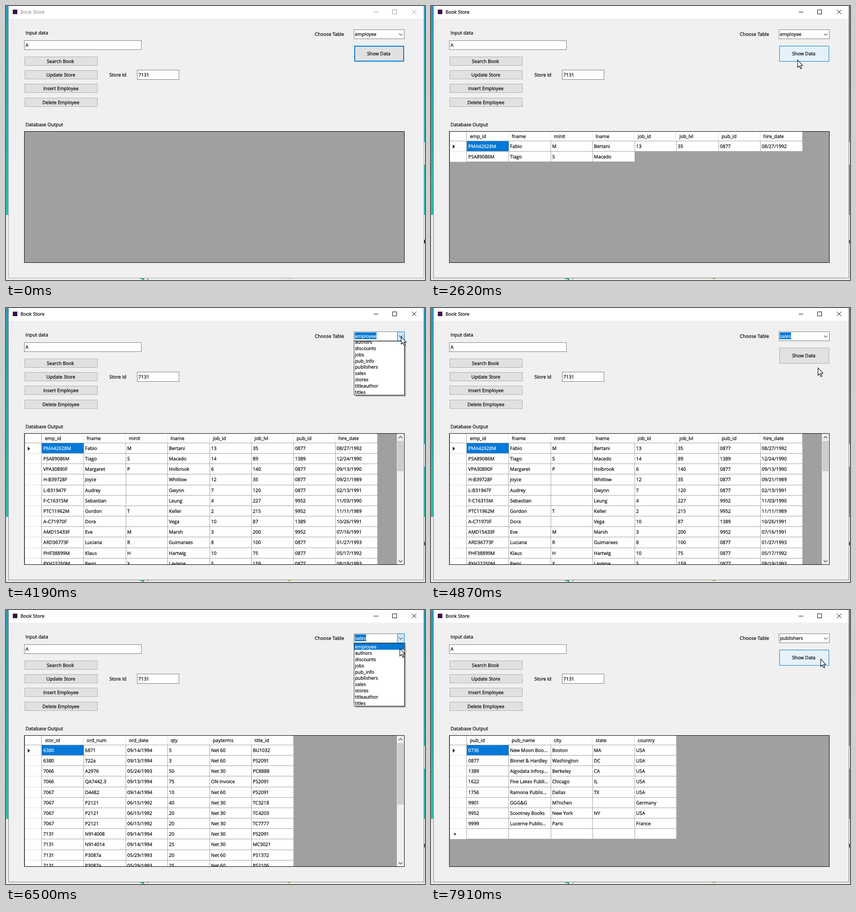
These frames come from a looping animation (924 by 606 pixels, 7990 ms). An HTML page with a canvas:

```html
<!DOCTYPE html>
<html lang="en">
<head>
<meta charset="utf-8">
<title>Book Store</title>
<style>
  html, body { margin: 0; width: 100%; height: 100%; overflow: hidden; background: #f0f0f0; }
  canvas { display: block; }
</style>
</head>
<body>
<canvas id="stage" width="924" height="606"></canvas>
<script>
const ctx = document.getElementById('stage').getContext('2d', { alpha: false });
const LOOP = 7990, START = 210, TICK = 77.78;
const BLUE = '#0078d7', GRID = '#a0a0a0';

const parseTable = (head, body) => ({
  head: head.split(','),
  rows: body.trim().split('\n').map(row => row.trim().split(',')),
});

const employee = {
  ...parseTable('emp_id,fname,minit,lname,job_id,job_lvl,pub_id,hire_date', `
    PMA42628M,Fabio,M,Bertani,13,35,0877,08/27/1992
    PSA89086M,Tiago,S,Macedo,14,89,1389,12/24/1990
    VPA30890F,Margaret,P,Holbrook,6,140,0877,09/13/1990
    H-B39728F,Joyce,,Whitlow,12,35,0877,09/21/1989
    L-B31947F,Audrey,,Gwynn,7,120,0877,02/13/1991
    F-C16315M,Sebastian,,Leung,4,227,9952,11/03/1990
    PTC11962M,Gordon,T,Keller,2,215,9952,11/11/1989
    A-C71970F,Dora,,Vega,10,87,1389,10/26/1991
    AMD15433F,Eve,M,Marsh,3,200,9952,07/16/1991
    ARD36773F,Luciana,R,Guimaraes,8,100,0877,01/27/1993
    PHF38899M,Klaus,H,Hartwig,10,75,0877,05/17/1992
    PXH22250M,Remi,X,Lavigne,5,159,0877,08/19/1993`),
  thumbEnd: 361,
};
const sales = {
  ...parseTable('stor_id,ord_num,ord_date,qty,payterms,title_id', `
    6380,6871,09/14/1994,5,Net 60,BU1032
    6380,722a,09/13/1994,3,Net 60,PS2091
    7066,A2976,05/24/1993,50,Net 30,PC8888
    7066,QA7442.3,09/13/1994,75,ON invoice,PS2091
    7067,D4482,09/14/1994,10,Net 60,PS2091
    7067,P2121,06/15/1992,40,Net 30,TC3218
    7067,P2121,06/15/1992,20,Net 30,TC4203
    7067,P2121,06/15/1992,20,Net 30,TC7777
    7131,N914008,09/14/1994,20,Net 30,PS2091
    7131,N914014,09/14/1994,25,Net 30,MC3021
    7131,P3087a,05/29/1993,20,Net 60,PS1372
    7131,P3087a,05/29/1993,25,Net 60,PS2106`),
  thumbEnd: 430,
};
const publishers = parseTable('pub_id,pub_name,city,state,country', `
    0736,New Moon Boo...,Boston,MA,USA
    0877,Binnet & Hardley,Washington,DC,USA
    1389,Algodata Infosy...,Berkeley,CA,USA
    1622,Five Lakes Publi...,Chicago,IL,USA
    1756,Ramona Publis...,Dallas,TX,USA
    9901,GGG&G,M?nchen,,Germany
    9952,Scootney Books,New York,NY,USA
    9999,Lucerne Publis...,Paris,,France
    ,,,,`);
publishers.newRow = 8;

const TABLES = ['employee', 'authors', 'discounts', 'jobs', 'pub_info', 'publishers',
  'sales', 'stores', 'titleauthor', 'titles'];

// Pointer path: tick, x, y
const PATH = [
  [0, 870, 588], [3, 902, 330], [6, 868, 75], [8, 850, 58], [10, 758, 62], [11, 690, 100],
  [12, 705, 160], [13, 775, 189], [14, 800, 202], [16, 812, 150], [19, 808, 119], [34, 808, 119],
  [37, 800, 150], [39, 815, 186], [42, 850, 90], [45, 868, 62], [46, 871, 63], [52, 871, 63],
  [56, 850, 162], [58, 850, 164], [62, 855, 99], [69, 855, 99], [73, 869, 66], [77, 870, 63],
  [80, 870, 63], [84, 860, 149], [88, 860, 150], [92, 871, 74], [96, 859, 108], [99, 859, 108],
];

const clamp = v => Math.max(0, Math.min(1, v));
const within = (v, from, to) => v >= from && v < to;

function pointerAt(tick) {
  const i = PATH.findIndex(p => p[0] > tick);
  if (i < 0) return PATH.at(-1).slice(1);
  const [t0, x0, y0] = PATH[i - 1], [t1, x1, y1] = PATH[i];
  const u = (tick - t0) / (t1 - t0);
  return [x0 + (x1 - x0) * u, y0 + (y1 - y0) * u];
}

function rect(x0, y0, x1, y1, color) {
  ctx.fillStyle = color;
  ctx.fillRect(x0, y0, x1 - x0, y1 - y0);
}

function box(x0, y0, x1, y1, fill, border, width = 1) {
  rect(x0, y0, x1, y1, border);
  rect(x0 + width, y0 + width, x1 - width, y1 - width, fill);
}

// A hairline stroke gives the text its dark, crisp weight.
function text(label, x, middle, color = '#000', align = 'left') {
  ctx.fillStyle = ctx.strokeStyle = color;
  ctx.lineWidth = .25;
  ctx.textAlign = align;
  ctx.fillText(label, x, Math.round(middle + 3.5));
  ctx.strokeText(label, x, Math.round(middle + 3.5));
}

function line(color, width, ...points) {
  ctx.strokeStyle = color;
  ctx.lineWidth = width;
  ctx.beginPath();
  points.forEach(([x, y]) => ctx.lineTo(x, y));
  ctx.stroke();
}

function polygon(color, points) {
  ctx.fillStyle = color;
  ctx.beginPath();
  points.forEach(([x, y]) => ctx.lineTo(x, y));
  ctx.closePath();
  ctx.fill();
}

const chevron = (x, y, dir, color, width = 1.1) =>
  line(color, width, [x - 4, y - 2 * dir], [x, y + 2 * dir], [x + 4, y - 2 * dir]);

function clipped(x0, y0, x1, y1, draw) {
  ctx.save();
  ctx.beginPath();
  ctx.rect(x0, y0, x1 - x0, y1 - y0);
  ctx.clip();
  draw();
  ctx.restore();
}

function drawDesktop(active) {
  rect(0, 0, 924, 606, '#ececec');
  const teal = ctx.createLinearGradient(0, 0, 0, 462);
  teal.addColorStop(0, '#2b98bb');
  teal.addColorStop(1, '#2abfa9');
  rect(0, 0, 5, 462, teal);
  rect(922, 0, 924, 301, teal);
  rect(922, 351, 924, 462, teal);
  rect(922, 517, 924, 525, active ? '#6b4a45' : '#222');
  rect(296, 602, 304, 604, '#35a99c');
  rect(301, 603, 305, 606, '#35a99c');
  rect(312, 602, 314, active ? 604 : 606, '#35a99c');
  rect(621, 602, 627, 604, active ? '#d8b03c' : '#f5cfa8');
}

function drawWindow(active) {
  rect(5, 0, 922, 602, active ? '#7d7d7d' : '#a6a6a6');
  rect(6, 0, 921, 28, '#fff');
  rect(6, 28, 921, 601, '#f0f0f0');
  rect(15, 8, 25, 18, '#3b1149');
  const ink = active ? '#000' : '#999';
  text('Book Store', 32, 13.5, ink);
  rect(811, 13, 821, 14, ink);
  ctx.strokeStyle = ink;
  ctx.lineWidth = 1;
  ctx.strokeRect(852.5, 8.5, 9, 9);
  line(ink, 1, [895, 8], [905, 18]);
  line(ink, 1, [905, 8], [895, 18]);

  text('Input data', 43, 59);
  box(40, 76, 299, 97, '#fff', '#7a7a7a');
  text('A', 43, 86);
  ['Search Book', 'Update Store', 'Insert Employee', 'Delete Employee'].forEach((label, i) => {
    const y = Math.round(112 + 30.2 * i);
    box(41, y, 202, y + 20, '#e1e1e1', '#adadad');
    text(label, i ? 121 : 120, y + 10, '#000', 'center');
  });
  text('Store Id', 228, 152);
  box(289, 141, 382, 163, '#fff', '#7a7a7a');
  text('7131', 292, 152);
  text('Choose Table', 681, 62);
  text('Database Output', 43, 262.5);
  box(40, 277, 879, 568, GRID, '#000');
}

const columnX = i => Math.round(78.6 + 92.5 * i);
const rowY = i => Math.round(298 + 23.15 * i);

function drawTable({ head, rows, thumbEnd, newRow }, cellLimit) {
  const right = columnX(head.length);
  rect(42, 278, right, 298, '#fff');
  head.forEach((name, c) => {
    text(name, columnX(c) + 7, 288.5);
    rect(columnX(c + 1) - 1, 279, columnX(c + 1), 298, '#e0e0e0');
  });
  rows.forEach((row, r) => {
    const top = rowY(r), bottom = rowY(r + 1);
    const shown = Math.min(row.length, cellLimit - r * row.length);
    if (shown <= 0) return;
    rect(42, top + 1, 78, bottom, '#fff');
    rect(42, bottom, 78, bottom + 1, '#e0e0e0');
    row.slice(0, shown).forEach((value, c) => {
      const selected = r + c === 0, left = columnX(c) + (c ? 1 : 0);
      rect(left, top + 1, columnX(c + 1), bottom, selected ? BLUE : '#fff');
      rect(columnX(c + 1), top + 1, columnX(c + 1) + 1, bottom, GRID);
      rect(left, bottom, columnX(c + 1) + 1, bottom + 1, GRID);
      text(value, columnX(c) + 3.3, top + 12.5, selected ? '#fff' : '#000');
    });
  });
  rect(78, 278, 79, rowY(Math.min(rows.length, Math.ceil(cellLimit / head.length))), GRID);
  rect(42, 298, right, 299, GRID);
  polygon('#3a0a3a', [[48, 306.5], [53, 311], [48, 315.5]]);
  if (newRow) text('*', 50, rowY(newRow) + 14);
  if (thumbEnd && cellLimit >= rows.length * head.length) {
    rect(862, 278, 878, 567, '#f0f0f0');
    rect(863, 294, 877, thumbEnd, '#cdcdcd');
    chevron(870, 286, -1, '#505050', 1.5);
    chevron(870, 560, 1, '#505050', 1.5);
  }
}

function drawOutput(tick) {
  clipped(41, 278, 878, 567, () => {
    if (tick >= 98) drawTable(publishers, Infinity);
    else if (tick >= 65) drawTable(sales, Infinity);
    else if (tick >= 31) drawTable(employee, [12, 52][tick - 31] ?? Infinity);
  });
}

function drawShowButton(hover, pressed, focused) {
  if (pressed) box(768, 88, 878, 123, '#cce4f7', '#005499');
  else if (hover) box(768, 88, 878, 123, '#e5f1fb', BLUE);
  else if (focused) box(768, 88, 878, 123, '#e1e1e1', BLUE, 2);
  else box(768, 88, 878, 123, '#e1e1e1', '#adadad');
  text('Show Data', 822, 105.5, '#000', 'center');
}

function drawCombo(value, hover, focused, open) {
  box(767, 52, 879, 73, '#fff', hover && !open ? BLUE : '#7a7a7a');
  if (open) box(863, 52, 879, 73, '#cce4f7', BLUE);
  if (focused) rect(769, 54, Math.round(770 + ctx.measureText(value).width), 69, BLUE);
  text(value, 769.5, 62, focused ? '#fff' : '#000');
  chevron(870.5, 62.8, 1, '#444');
}

function drawDropDown(open, current, pointerY) {
  const top = 73, full = 140, pitch = 13.85;
  const bottom = Math.round(top + full * open), shift = bottom - top - full;
  rect(771, top, 882, bottom + 3, 'rgba(0,0,0,.16)');
  rect(770, top, 881, bottom + 2, 'rgba(0,0,0,.28)');
  box(767, top, 879, bottom, '#fff', '#333');
  const hovered = Math.floor((pointerY - top - 1) / pitch);
  const marked = hovered >= 0 ? hovered : TABLES.indexOf(current);
  clipped(768, top, 878, bottom - 1, () => TABLES.forEach((name, i) => {
    const y = top + 1 + shift + i * pitch;
    if (i === marked) rect(768, y, 878, y + pitch, BLUE);
    text(name, 769.5, y + 7.6, i === marked ? '#fff' : '#000');
  }));
}

function drawPointer(x, y) {
  ctx.save();
  ctx.translate(Math.round(x) + .5, Math.round(y) + .5);
  ctx.beginPath();
  [[0, 0], [0, 16.5], [3.8, 13], [6.5, 19.3], [9, 18.2], [6.4, 12], [11, 12]]
    .forEach(([px, py]) => ctx.lineTo(px, py));
  ctx.closePath();
  ctx.fillStyle = '#fff';
  ctx.fill();
  ctx.strokeStyle = '#000';
  ctx.lineWidth = 1.1;
  ctx.stroke();
  ctx.restore();
}

function draw(time) {
  const tick = Math.min(99, Math.floor((time - START) / TICK + .25));
  const active = tick >= 23;
  const [x, y] = tick >= 0 ? pointerAt(tick) : [-99, -99];
  const over = (top, bottom) => within(x, 767, 879) && within(y, top, bottom);

  const value = tick >= 88 ? 'publishers' : tick >= 58 ? 'sales' : 'employee';
  const pressed = within(tick, 23, 28) || within(tick, 63, 65) || tick === 97;
  const comboFocused = within(tick, 49, 63) || within(tick, 78, 97);
  const open = within(tick, 50, 58) ? clamp((tick - 49.45) * .553)
    : within(tick, 79, 88) ? clamp((tick - 78) * .553) : 0;

  ctx.font = '10.4px "Open Sans", "Noto Sans", sans-serif';
  ctx.textRendering = 'geometricPrecision';
  ctx.lineJoin = 'miter';
  drawDesktop(active);
  drawWindow(active);
  drawOutput(tick);
  drawShowButton(over(88, 123) && !open, pressed, !comboFocused);
  drawCombo(value, over(52, 75), comboFocused, open > 0);
  if (open) drawDropDown(open, value, y);
  if (tick >= 0) drawPointer(x, y);
}

function frame() {
  draw(performance.now() % LOOP);
  requestAnimationFrame(frame);
}
frame();
</script>
</body>
</html>
```
